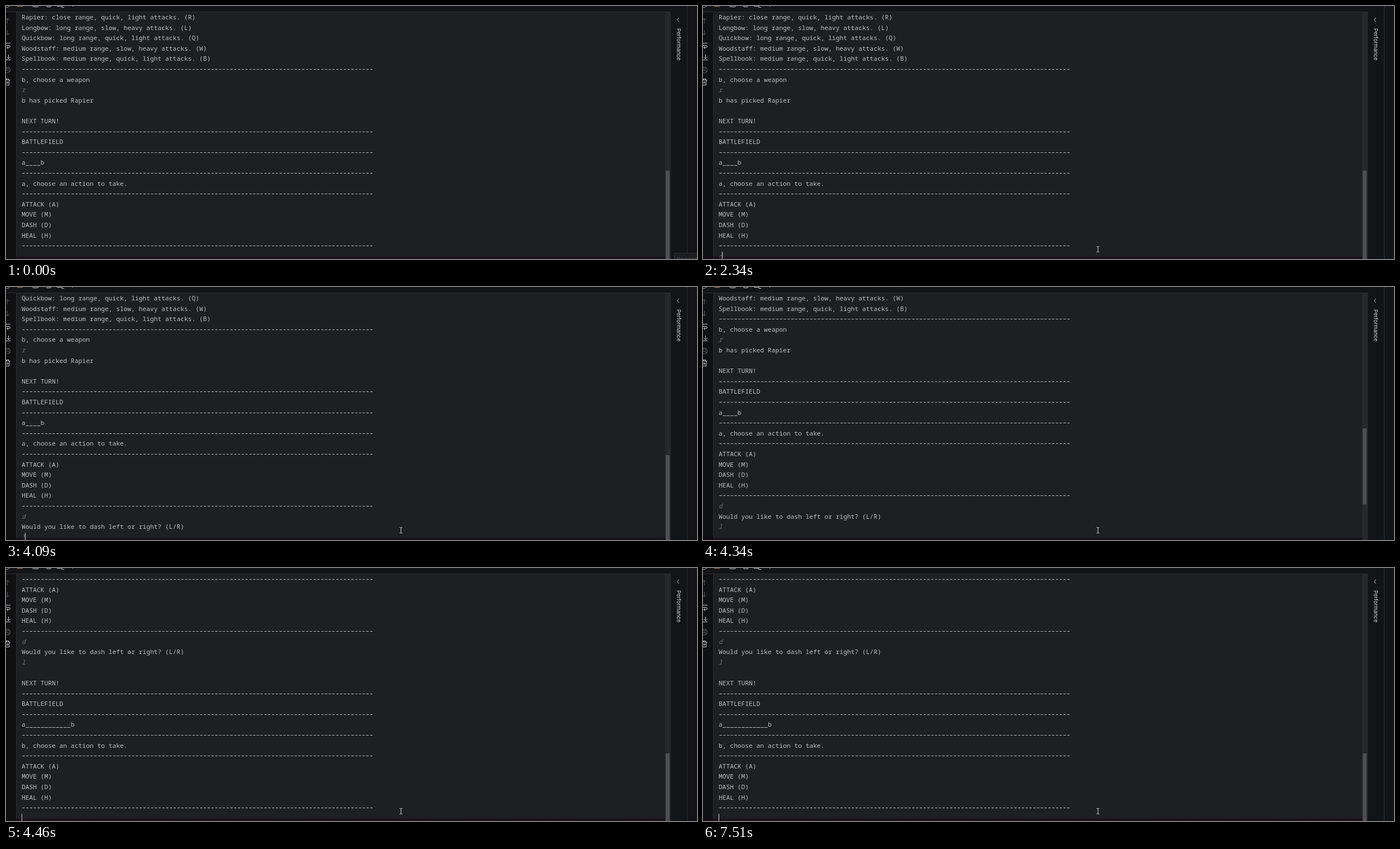
Animation of 1236 by 453 pixels, one loop 8000 ms. Source, as an HTML page with a canvas:

```html
<!DOCTYPE html>
<html lang="en">
<head>
<meta charset="utf-8">
<title>Console game</title>
<style>
  html, body { margin: 0; width: 100%; height: 100%; overflow: hidden; background: #131417; }
  canvas { display: block; width: 1236px; height: 453px; }
</style>
</head>
<body>
<canvas id="stage" width="1236" height="453"></canvas>
<script>
const ctx = document.getElementById('stage').getContext('2d');
const W = 1236, H = 453, LOOP = 8000;
const LEFT = 28, ADV = 6.763, PITCH = 18.6, BASE = 24;
const MONO = '11.27px "JetBrains Mono", "Noto Sans Mono", "DejaVu Sans Mono", monospace';
const RULE = '-'.repeat(93);

const turn = (field, who) => [
  'NEXT TURN!', RULE, 'BATTLEFIELD', RULE, field, RULE,
  who + ', choose an action to take.', RULE,
  'ATTACK (A)', 'MOVE (M)', 'DASH (D)', 'HEAL (H)', RULE
];

// Lines starting with ">" are typed by the player.
const log = [
  'Rapier: close range, quick, light attacks. (R)',
  'Longbow: long range, slow, heavy attacks. (L)',
  'Quickbow: long range, quick, light attacks. (Q)',
  'Woodstaff: medium range, slow, heavy attacks. (W)',
  'Spellbook: medium range, quick, light attacks. (B)',
  RULE, 'b, choose a weapon', '>r', 'b has picked Rapier', '',
  ...turn('a____b', 'a'),
  '>d', 'Would you like to dash left or right? (L/R)', '>l', '',
  ...turn('a____________b', 'b')
];

// at: ms, top: first visible line, count: lines printed so far
const views = [
  { at: 0, top: 0, count: 23, thumb: [295, 453] },
  { at: 2340, top: 0, count: 24, thumb: [295, 453] },
  { at: 2780, top: 2, count: 25, thumb: [301, 453] },
  { at: 4090, top: 2, count: 26, thumb: [301, 453] },
  { at: 4340, top: 3, count: 26, thumb: [253, 389] },
  { at: 4400, top: 17, count: 40, thumb: [332, 453] }
];

// column is -1 while the caret is hidden
const carets = [
  { at: 0, col: -1 }, { at: 600, col: 93, row: 22 }, { at: 1100, col: -1 },
  { at: 1530, col: 0 }, { at: 2030, col: -1 }, { at: 2340, col: 1 },
  { at: 2780, col: 0 }, { at: 3600, col: -1 }, { at: 4030, col: 0 },
  { at: 4090, col: 1 }, { at: 4340, col: -1 }, { at: 4460, col: 0 },
  { at: 5080, col: -1 }, { at: 5510, col: 0 }, { at: 6010, col: -1 },
  { at: 6510, col: 0 }, { at: 7010, col: -1 }, { at: 7510, col: 0 }
];

const current = (list, t) => list.filter(s => s.at <= t).pop();

function box(color, x, y, w, h) {
  ctx.fillStyle = color;
  ctx.fillRect(x, y, w, h);
}

function stroke(color, d, width = 1) {
  ctx.strokeStyle = color;
  ctx.lineWidth = width;
  ctx.stroke(new Path2D(d));
}

function text(str, x, y, font, color) {
  ctx.font = font;
  ctx.fillStyle = color;
  ctx.fillText(str, x, y);
}

function dashes(col, n, y, len) {
  ctx.fillStyle = '#b4b6bc';
  for (let i = col; i < col + n; i++) {
    ctx.fillRect(LEFT + i * ADV + (ADV - len) / 2, y, len, 1);
  }
}

function drawLine(line, row) {
  const y = Math.round(BASE + row * PITCH);
  if (line === RULE) {
    dashes(0, RULE.length, y - 4, 4.2);
  } else if (line.includes('__')) {
    const n = line.length - 2;
    text(line[0], LEFT, y, MONO, '#bcbec4');
    dashes(1, n, y + 1, 5.7);
    text(line[n + 1], LEFT + (n + 1) * ADV, y, MONO, '#bcbec4');
  } else if (line[0] === '>') {
    text(line.slice(1), LEFT, y, 'italic ' + MONO, '#6b6e73');
  } else {
    text(line, LEFT, y, MONO, '#bcbec4');
  }
}

function drawToolbars() {
  const dim = '#55575b', lit = '#c6c8cd';
  box('#131417', 0, 0, W, H);
  box('#0f1012', 0, 11, 18, H);
  box('#1e1f22', 19, 11, 1160, H);
  box('#2b2d30', 0, 10, 1189, 1);
  box('#2b2d30', 18, 11, 1, H);
  box('#27282b', 1179, 11, 9, H);
  box('#2b2d30', 1188, 11, 1, H);
  box('#2b2d30', 1218, 0, 1, H);

  // lower edges of the upper icon row
  stroke('#8a8c90', 'M0 2.5H3L7 0');
  stroke('#a4613d', 'M20 0.5H30', 1.5);
  stroke(lit, 'M47.5 0Q48 1.5 50 1.5H56Q58 1.5 58.5 0');
  stroke(lit, 'M72.5 0Q72.5 1.5 74 1.5H79Q80.5 1.5 80.5 0');
  stroke(lit, 'M91 0.5H101M99 2.5H104');
  box(lit, 119, 0, 1, 1);

  // left icon column
  stroke(dim, 'M2.5 31V22M-1 25.5L2.5 22L6 25.5');
  stroke(dim, 'M2.5 43V52M-1 48.5L2.5 52L6 48.5');
  stroke(lit, 'M0 66.5H8M0 70.5H5Q7.5 70.5 7.5 72.5T5 74.5H2M4 72L1.5 74.5L4 77');
  stroke(lit, 'M4.5 87V94M1.5 91.5L4.5 94.5L7.5 91.5M0 96.5H8');
  stroke(dim, 'M0 112.5V109.5H5.5V112.5M0 112.5H7.5V117.5H5.5M0 115.5H5.5V119.5H0');
  stroke(lit, 'M0 132.5H7.5M0.5 132V130.5H4.5V132M6 133L5.5 141.5H0M1.5 135V139M3.5 135V139');

  // right tool window header
  stroke('#b4b6bb', 'M1203.7 21L1200.5 24.5L1203.7 28');
  ctx.save();
  ctx.translate(1199.5, 40);
  ctx.rotate(Math.PI / 2);
  text('Performance', 0, 0, '9.4px Inter, sans-serif', '#d5d7dc');
  ctx.restore();
}

function drawTooltip() {
  box('#2c2d30', 1195, 442, 41, 11);
  box('#1c1d1f', 1196, 443, 40, 10);
  text('Recording', 1200, 457.5, '11px Inter, sans-serif', '#4a4b4e');
}

function pointerAt(t) {
  if (t < 350) return null;
  const glide = (start, span, steps) =>
    Math.min(1, Math.max(0, Math.floor((t - start) / span * steps + 0.01) / steps));
  const a = glide(350, 500, 7), b = glide(1030, 500, 7);
  return [Math.round(704 - 12 * a + 14 * b), Math.round(432 + 7 * a - 4 * b)];
}

function drawPointer(t) {
  const p = pointerAt(t);
  if (!p) return;
  const [x, y] = p;
  const c = '#d6d8dc';
  box(c, x, y - 4, 1, 9);
  for (const edge of [y - 5, y + 5]) {
    box(c, x - 2, edge, 2, 1);
    box(c, x + 1, edge, 2, 1);
  }
}

function draw(t) {
  const view = current(views, t), caret = current(carets, t);
  drawToolbars();
  if (t < 60) drawTooltip();

  const [y0, y1] = view.thumb;
  box('#4d4e51', 1180, y0, 7, y1 - y0);
  log.slice(view.top, view.count).forEach(drawLine);

  const fade = ctx.createLinearGradient(0, 447, 0, H);
  fade.addColorStop(0, 'rgba(22,12,17,0)');
  fade.addColorStop(0.5, 'rgba(22,12,17,.6)');
  fade.addColorStop(1, 'rgba(22,12,17,.8)');
  box(fade, 0, 447, 1179, 6);

  if (caret.col >= 0) {
    const row = caret.row ?? 23;
    box('#ced0d6', Math.floor(LEFT + caret.col * ADV + 0.1), Math.round(12 + row * PITCH), 1, 16);
  }
  drawPointer(t);
}

const start = performance.now();
function frame() {
  draw((performance.now() - start) % LOOP);
  requestAnimationFrame(frame);
}
frame();
</script>
</body>
</html>
```
